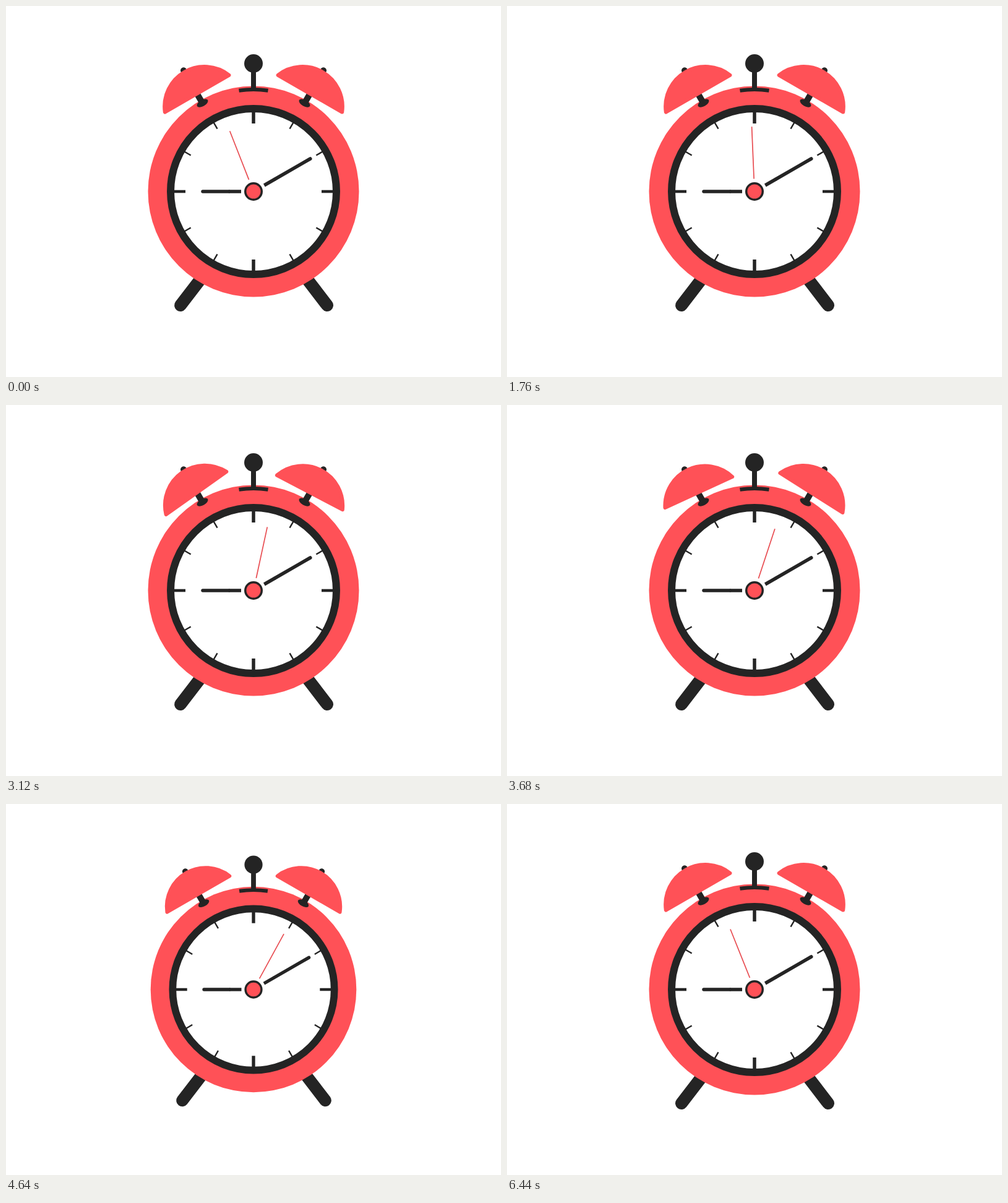
An HTML page that plays this animation: 800x600 px, repeating every 6.48 s.

```html
<!DOCTYPE html>
<html lang="en">
<head>
<meta charset="utf-8">
<title>Alarm clock</title>
<style>
  html, body { margin: 0; width: 100%; height: 100%; overflow: hidden; background: #fff; }
  svg { display: block; width: 800px; height: 600px; }
  .dark { fill: #242424; }
  .red { fill: #ff5157; }
  .line { fill: none; stroke: #242424; }
  .round { stroke-linecap: round; }
</style>
</head>
<body>
<svg viewBox="-400 -300 800 600">
  <defs>
    <path id="dome" class="red" d="M-59.8-182.8A64.5 64.5 0 0 1 59.8-182.8Z"
      stroke="#ff5157" stroke-width="6" stroke-linejoin="round"/>
    <g id="post">
      <path class="line round" stroke-width="10" d="M0-166V-226"/>
      <ellipse class="dark" cy="-165" rx="10" ry="5"/>
    </g>
  </defs>
  <g id="clock">
    <path id="legL" class="line round" d="M-118 184L-75 128"/>
    <path id="legR" class="line round" d="M119 184L76 128"/>
    <circle class="red" r="170.5"/>
    <circle r="134" fill="#fff" stroke="#242424" stroke-width="12"/>
    <g id="ticks"></g>
    <g id="handle">
      <path class="line" stroke-width="6" d="M-23.5-163.3A165 165 0 0 1 23.5-163.3"/>
      <path class="line" stroke-width="8" d="M0-165V-200"/>
      <circle class="dark" cy="-207" r="15"/>
    </g>
    <g transform="rotate(-30)"><g class="bell"><use href="#post"/><use id="domeL" href="#dome"/></g></g>
    <g transform="rotate(30)"><g class="bell"><use href="#post"/><use id="domeR" href="#dome"/></g></g>
    <g id="hands">
      <path class="line" stroke-width="5.5" d="M-20 0H-40"/>
      <path class="line round" stroke-width="5.5" d="M-40 0H-82"/>
      <g transform="rotate(-30)">
        <path class="line" stroke-width="5.5" d="M20 0H40"/>
        <path class="line round" stroke-width="5.5" d="M40 0H106"/>
      </g>
      <path id="second" d="M0-20.5V-105" stroke="#e84c51" stroke-width="1.7"/>
      <circle class="dark" r="15"/>
      <circle class="red" r="11.5"/>
    </g>
  </g>
</svg>
<script>
const LOOP = 6480, INTRO = 4930, FRAME = 40;
const $ = id => document.getElementById(id);
const set = (el, value) => el.setAttribute('transform', value);
const progress = (t, start, length) => Math.min(1, Math.max(0, (t - start) / length));
const backIn = (p, s) => p * p * ((s + 1) * p - s);
const pop = (t, start, length, s = 1.6) => 1 - backIn(1 - progress(t, start, length), s);
const scaleAt = (k, y) => `translate(0 ${y}) scale(${k}) translate(0 ${-y})`;
const bells = document.querySelectorAll('.bell');

$('ticks').innerHTML = Array.from({ length: 12 }, (_, i) => {
  const major = i % 3 === 0;
  const width = major ? (i % 6 ? 4.6 : 5.5) : 2.4;
  return `<path class="line" stroke-width="${width}" transform="rotate(${i * 30})"
    d="M0-130V${major ? -110 : -117}"/>`;
}).join('');

function draw(time) {
  const now = Math.floor(time / FRAME) * FRAME;
  const t = (now + LOOP - INTRO) % LOOP; // time since the clock begins to appear

  const leave = backIn(progress(t, 5700, 621) ** 1.3, 2.6);
  set($('clock'), `scale(${pop(t, 0, 500, 0.93) * (1 - leave)})`);

  const tuck = (1 - progress(t, 390, 300)) ** 2;
  for (const [id, side] of [['legL', 1], ['legR', -1]]) {
    set($(id), `translate(${60 * tuck * side} ${-44 * tuck})`);
    $(id).setAttribute('stroke-width', 20 - 5 * tuck);
  }

  set($('handle'), scaleAt(pop(t, 710, 320), -165));
  for (const bell of bells) set(bell, scaleAt(pop(t, 790, 400), -165));
  set($('ticks'), `scale(${pop(t, 710, 360, 0)})`);
  set($('hands'), `scale(${pop(t, 870, 400)})`);
  set($('second'), `rotate(${-38.1 + 0.01078 * t})`);

  const ringing = t > 4310 && t < 5670;
  const swing = ringing ? -Math.cos((t - 4670) / 80 * Math.PI) : 0;
  set($('domeL'), `rotate(${5.3 * swing} 0 -168)`);
  set($('domeR'), `rotate(${2.3 * swing} 0 -168)`);
}

const start = performance.now();
function tick(now) {
  draw(Math.max(0, now - start) % LOOP);
  requestAnimationFrame(tick);
}
draw(0);
requestAnimationFrame(tick);
</script>
</body>
</html>
```
